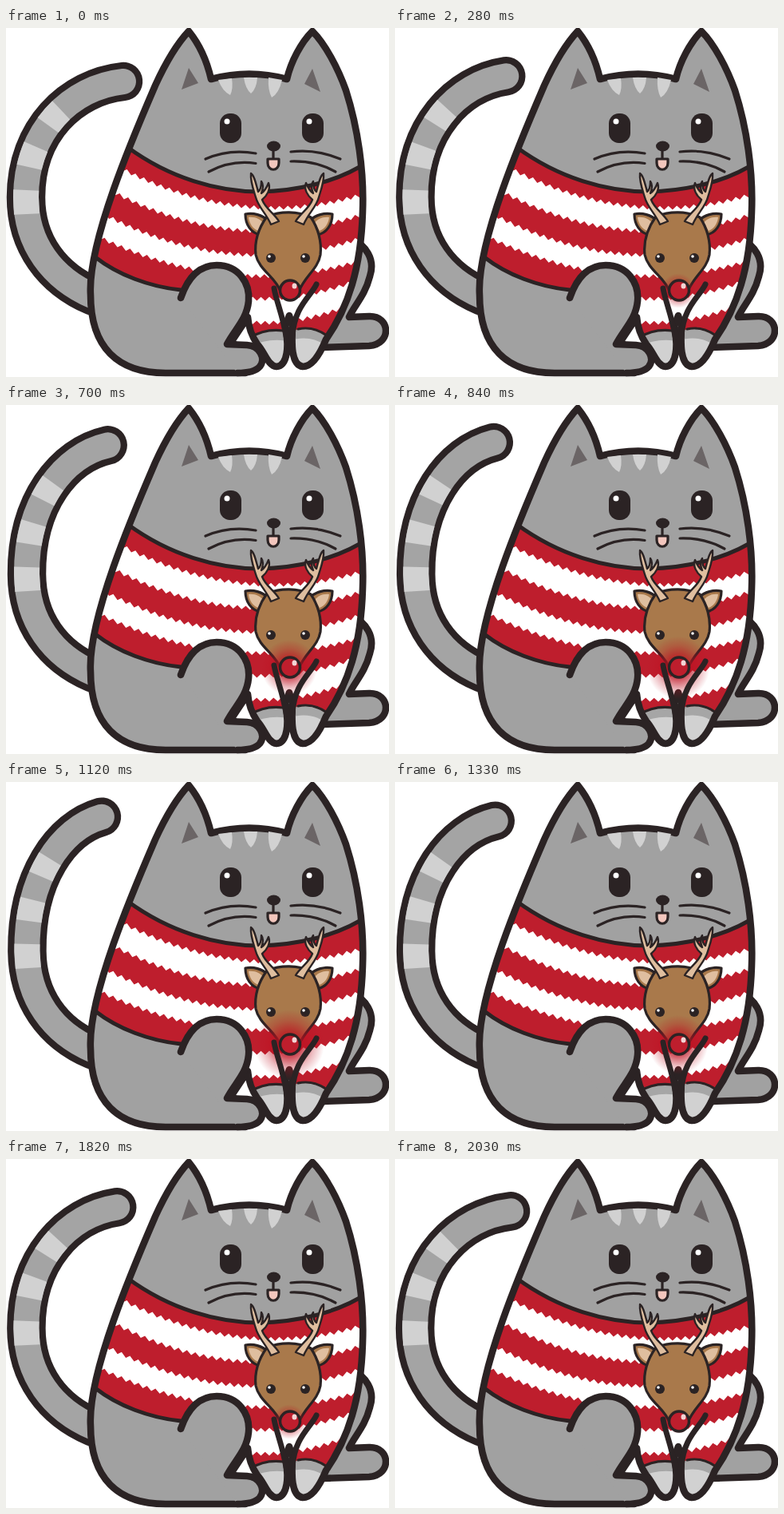
Recreate the animation shown at these times as an HTML page. Size 480 by 437 pixels, loop 2100 ms.

```html
<!DOCTYPE html>
<html lang="en">
<head>
<meta charset="utf-8">
<title>Cat in a reindeer sweater</title>
<style>
  html, body { margin: 0; width: 100%; height: 100%; overflow: hidden; background: #fff; }
  svg { display: block; width: 480px; height: 437px; }
  .line { fill: none; stroke: #2b2324; stroke-width: 8.6; stroke-linecap: round; stroke-linejoin: round; }
  .thin { stroke-width: 3.2; }
  .fur { fill: #a1a1a1; }
  .light { fill: #d1d1d1; }
  .dark { fill: #2b2324; }
  .brown { fill: #a9794b; }
  .tan { fill: #dfbe9f; }
  .red { fill: #be1e2d; }
  .pink { fill: #f3c6bd; }
</style>
</head>
<body>
<svg viewBox="0 0 480 437">
  <defs>
    <path id="body" d="M229 4C242 20 252 42 257 64Q305 51 352 64C357 42 370 18 384 4C400 20 416 50 426 78
      C441 125 449 180 447 230C445 300 429 350 401 390C392 412 382 424 372 424C357 422 358 395 359 373L355 360L350 373
      C355 398 353 423 339 424C328 423 324 405 315 396C308 386 304 375 303 362L283 392L300 412V432H200
      C140 432 106 400 106 334C102 268 162 130 187 72C198 48 214 20 229 4Z"/>
    <clipPath id="bodyClip"><use href="#body"/></clipPath>
    <path id="sweater" d="M145 143L152 149C205 188 265 205 318 205C365 204 410 193 443 174L460 170V280L402 385
      Q385 373 366 377L355 382L347 379Q325 376 305 388L219 328C180 324 140 309 112 287L90 270Z"/>
    <clipPath id="sweaterClip"><use href="#sweater"/></clipPath>
    <radialGradient id="glowFill">
      <stop offset="0" stop-color="#be1020"/>
      <stop offset=".35" stop-color="#be1020" stop-opacity=".75"/>
      <stop offset=".7" stop-color="#be1020" stop-opacity=".28"/>
      <stop offset="1" stop-color="#be1020" stop-opacity="0"/>
    </radialGradient>
    <path id="antler" class="line tan" style="stroke-width:2.400" d="M332 246C326 232 316 224 313 212C310 202 306 192 307 182
      C311 184 313 194 316 205C319 203 320 198 320 192C323 196 322 202 320 207C325 204 327 199 329 194
      C332 202 327 210 321 215C325 226 336 232 342 242Z"/>
    <g id="deerEar">
      <path class="line thin brown" d="M300 233C310 231 321 234 328 241L319 259C307 257 300 246 300 233Z"/>
      <path class="tan" d="M304 237C313 236 319 240 322 244L316 254C309 251 305 245 304 237Z"/>
    </g>
  </defs>

  <g fill="none" stroke-linecap="round">
    <path class="tail" stroke="#2b2324" stroke-width="48.500"/>
    <path class="tail" stroke="#a4a4a4" stroke-width="32"/>
    <path id="rings" stroke="#d1d1d1" stroke-width="32" stroke-linecap="butt" stroke-dasharray="30 29 27 31 25 999"/>
  </g>

  <path class="line fur" d="M430 262C452 272 463 290 456 311C450 335 436 348 430 362L455 361C482 360 484 396 455 398L395 400Z"/>

  <use href="#body" class="fur"/>
  <g clip-path="url(#bodyClip)">
    <path class="light" d="M300 388Q325 376 347 379L355 382L366 377Q385 373 404 386V430H300Z"/>
    <path d="M304 394Q325 383 350 386M362 384Q385 380 402 392" fill="none" stroke="#a6a6a6" stroke-width="11"/>
    <use href="#sweater" class="red"/>
    <g id="bands" fill="#fff" clip-path="url(#sweaterClip)"></g>
    <path class="line" style="stroke-width:5" d="M152 149C205 188 265 205 318 205C365 204 410 193 443 174M112 287C140 309 180 324 219 328"/>
    <path class="line thin" d="M305 388Q325 376 347 379M366 377Q385 373 402 385"/>
  </g>
  <use href="#body" class="line"/>
  <path class="line fur" d="M219 338C228 312 242 297 264 297C292 297 306 320 304 342C302 365 286 378 277 396L302 397
    C318 398 326 414 318 424C312 431 300 432 290 432"/>

  <path fill="#6b6566" d="M229 50L220 77L241 69ZM384 51L374 70L394 80Z"/>
  <path class="light" d="M266 65L283 63Q285 76 281 84Q271 79 266 65ZM298 62H315Q314 76 307 82Q300 76 298 62ZM329 62L346 65Q342 82 333 87Q328 78 329 62Z"/>

  <g id="openEyes">
    <rect class="dark" x="268" y="107" width="27" height="37" rx="12.500"/>
    <rect class="dark" x="371" y="107" width="27" height="37" rx="12.500"/>
    <g fill="#fff"><circle cx="277" cy="117" r="3.500"/><circle cx="380" cy="117" r="3.500"/></g>
  </g>
  <path id="shutEyes" d="M268 127H295M371 127H398" stroke="#2b2324" stroke-width="4"/>

  <path class="line thin" d="M250 164Q280 151 313 157M254 180Q282 165 313 169.500M357 155Q388 151 419 164M357 167Q388 166 413 180"/>
  <path class="line thin pink" d="M335 150V164M328 164H342V169C342 180 328 180 328 169Z"/>
  <ellipse class="dark" cx="335.500" cy="148" rx="8.500" ry="6.500"/>

  <use href="#deerEar"/>
  <use href="#deerEar" transform="matrix(-1 0 0 1 709 0)"/>
  <path class="line thin brown" d="M327 236C344 229 366 229 382 237C391 250 396 268 394 284C391 302 374 311 367 330L344 330
    C339 313 317 303 313 284C311 266 317 250 327 236Z"/>
  <use href="#antler"/>
  <use href="#antler" transform="matrix(-1 0 0 1 705 0)"/>
  <circle class="dark" cx="332" cy="288" r="6"/><circle class="dark" cx="375" cy="288" r="6"/>
  <g fill="#fff"><circle cx="330" cy="286" r="1.800"/><circle cx="373" cy="286" r="1.800"/></g>

  <circle id="glow" cx="355" cy="329" fill="url(#glowFill)"/>
  <path class="line" style="stroke-width:7" d="M336 326C339 343 347 360 351 386M389 321C382 336 361 349 359 386"/>
  <circle class="line red" style="stroke-width:3.500" cx="356" cy="328.500" r="12.500"/>
  <ellipse cx="361.500" cy="323" rx="3" ry="3.500" fill="#f3d5d5"/>
</svg>
<script>
const $ = id => document.getElementById(id);
const LOOP = 2100, STEP = 70, TOOTH = 10.5;

// Saw-toothed arc through three points.
function zigzag([x0, y0], [xm, ym], [x1, y1]) {
  const count = 2 * Math.round((x1 - x0) / TOOTH), points = [];
  const cx = 2 * xm - (x0 + x1) / 2, cy = 2 * ym - (y0 + y1) / 2;
  for (let i = 0; i <= count; i++) {
    const t = i / count, u = 1 - t;
    const x = u * u * x0 + 2 * u * t * cx + t * t * x1;
    const y = u * u * y0 + 2 * u * t * cy + t * t * y1;
    points.push([x, y + (i % 2 ? 2.4 : -2.4)]);
  }
  return points;
}

const edges = [
  [[141, 174], [295, 223], [448, 208]],
  [[132, 204], [290, 253], [448, 233]],
  [[124, 234], [286, 283], [448, 262]],
  [[113, 260], [282, 309], [448, 290]],
  [[230, 322], [330, 339], [440, 316]],
  [[230, 352], [330, 369], [430, 347]]
].map(edge => zigzag(...edge));

for (let i = 0; i < edges.length; i += 2) {
  const band = document.createElementNS('http://www.w3.org/2000/svg', 'polygon');
  band.setAttribute('points', [...edges[i], ...edges[i + 1].reverse()].join(' '));
  $('bands').append(band);
}

function draw(time) {
  const t = Math.floor(time % LOOP / STEP) * STEP;
  const p = 1 - Math.abs(1 - 2 * t / LOOP);
  const mix = (a, b) => (a + (b - a) * p).toFixed(2);

  const joint = `${mix(25, 26.5)} 212`;
  const upper = `C${mix(25, 25.5)} ${mix(128, 119)} ${mix(82, 68)} ${mix(74, 57)} ${mix(147, 118)} ${mix(67, 42)}`;
  const tail = `M110 336C58 314 ${mix(25, 27)} 270 ${joint}${upper}`;
  document.querySelectorAll('.tail').forEach(el => el.setAttribute('d', tail));
  $('rings').setAttribute('d', `M${mix(26, 28)} 233L${joint}${upper}`);

  $('glow').setAttribute('r', mix(13, 46));

  const blink = t >= 1470 && t < 1680;
  $('openEyes').style.display = blink ? 'none' : '';
  $('shutEyes').style.display = blink ? '' : 'none';
}

const start = performance.now();
function tick() {
  draw(performance.now() - start);
  requestAnimationFrame(tick);
}
tick();
</script>
</body>
</html>
```
